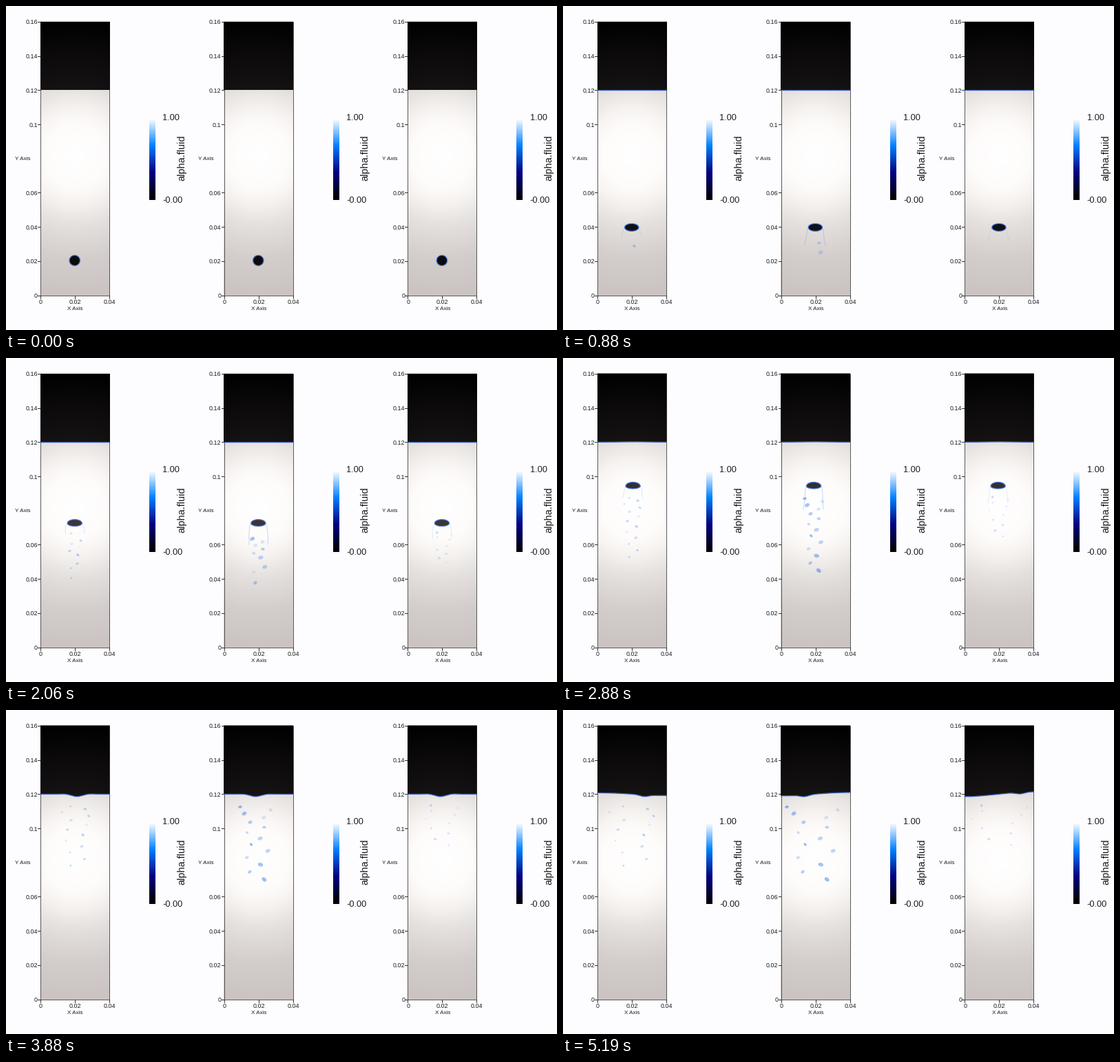
A matplotlib script for the animation above (5250 ms loop, 800 px wide and 471 px high).

```python
import numpy as np
import matplotlib.pyplot as plt
from matplotlib.animation import FuncAnimation
from matplotlib.collections import EllipseCollection
from matplotlib.patches import Polygon, Rectangle

W, H, DPI = 800, 471, 100
LOOP, STEP = 5250, 50
PX = 72 / DPI
TOP, BOTTOM, LEVEL = 23, 420.5, 122.3
MERGE = 3780
INK = "#1c1c1c"
XS = np.linspace(0, 100, 201)

fig = plt.figure(figsize=(W / DPI, H / DPI), dpi=DPI, facecolor="#fdfcfe")
ax = fig.add_axes([0, 0, 1, 1])
ax.axis("off")


def ramp(d, stops, colors):
    colors = np.array(colors) / 255
    return np.stack([np.interp(d, stops, colors[:, k]) for k in range(3)], -1)


def liquid(d):
    return ramp(d, [0, 45, 70, 100, 150, 200],
                [(255, 255, 255), (254, 252, 251), (246, 242, 240),
                 (229, 225, 223), (211, 205, 203), (203, 196, 194)])


def gas(d):
    return ramp(d, [20, 45, 100, 150, 200],
                [(62, 53, 55), (44, 39, 41), (20, 18, 18), (12, 10, 11), (0, 0, 0)])


def shade(func):
    y, x = np.mgrid[TOP:BOTTOM:398j, -50:50:101j]
    return func(np.hypot(x, y - 218))


def label(x, y, s, size, va="center_baseline", **kw):
    ax.text(x, y, s, fontsize=size * PX, family="Liberation Sans", color=INK, va=va, **kw)


def bell(center, width):
    return np.exp(-((XS - center) / width) ** 2)


def bubble_y(t):
    """Short start from rest, then a nearly steady rise to the surface."""
    speed, settle = 0.068, 332
    if t < settle:
        return 370 - speed * t * t / (2 * settle)
    return np.interp(t, [settle, 880, 2060, 2880, 3380, MERGE],
                     [358.7, 321.5, 241, 185.5, 148, LEVEL])


class Panel:
    def __init__(self, left, drift, lean, dip, tilt, notch, drops, tail, seed):
        self.left, self.drift, self.lean = left, drift, lean
        self.dip, self.tilt, self.notch = dip, tilt, notch
        self.tail_alpha, self.tail_len = tail
        self.static()
        ext = (left - 0.5, left + 100.5, BOTTOM + 0.5, TOP - 0.5)
        ax.imshow(shade(liquid), extent=ext, aspect="auto", zorder=1)
        self.make_drops(*drops, np.random.default_rng(seed))
        self.tails = [ax.plot([], [], color="#7fa8ea", lw=PX, zorder=2)[0] for _ in range(2)]
        self.bubble = Polygon(np.eye(3, 2), ec="#4a78e0", lw=1.2 * PX, zorder=3)
        self.air = Polygon(np.eye(3, 2), fc="none", ec="none")
        ax.add_patch(self.bubble)
        ax.add_patch(self.air)
        dark = ax.imshow(shade(gas), extent=ext, aspect="auto", zorder=4)
        dark.set_clip_path(self.air)
        self.line, = ax.plot([], [], color="#355fc0", lw=1.3 * PX, zorder=5)

    def static(self):
        x0 = self.left
        ax.add_patch(Rectangle((x0, TOP), 100, BOTTOM - TOP, fill=False,
                               ec="#4a4a4a", lw=0.9 * PX, zorder=2.5))
        for i in range(9):
            y = BOTTOM - i * (BOTTOM - TOP) / 8
            if i != 4:
                ax.plot([x0 - 4, x0], [y, y], color=INK, lw=0.9 * PX)
                label(x0 - 4, y, f"{i * 0.02:.2g}", 8.9, ha="right")
        label(x0 - 15, 221.5, "Y Axis", 8.1, ha="right")
        for i, s in enumerate(["0", "0.02", "0.04"]):
            x = x0 + 50 * i
            ax.plot([x, x], [BOTTOM, BOTTOM + 4], color=INK, lw=0.9 * PX)
            label(x + 0.5, 429.5, s, 8.9, ha="center")
        label(x0 + 50.5, 440, "X Axis", 8.2, ha="center")
        bar = ramp(np.linspace(1, 0, 64), [0, 1 / 3, 2 / 3, 1],
                   [(0, 0, 0), (0, 0, 128), (0, 128, 255), (255, 255, 255)])
        ax.imshow(bar[:, None], extent=(x0 + 158, x0 + 166.5, 282, 163), aspect="auto")
        label(x0 + 177.5, 161, "1.00", 12.8, ha="left")
        label(x0 + 177.5, 281, "-0.00", 12.8, ha="left")
        label(x0 + 205, 221, "alpha.fluid", 14.5, va="center", ha="center", rotation=90)

    def make_drops(self, n, size, strength, reach, rng):
        """Droplets shed by the bubble, each trailing it by its own gap."""
        self.gap = np.linspace(0.12, 1, n) ** 1.5 * reach + 8
        side = np.where(np.arange(n) % 2, 1, -1)
        self.spread = side * rng.uniform(0.3, 1, n) * (1 - self.gap / 220)
        self.birth = rng.uniform(500, 2600, n)
        self.alpha = strength * rng.uniform(0.5, 1.6, n)
        d = size * rng.uniform(0.8, 1.3, n)
        self.drops = EllipseCollection(
            d * 1.2, d * 0.85, rng.uniform(-60, 60, n), units="x",
            offsets=np.zeros((n, 2)), offset_transform=ax.transData, linewidths=0, zorder=2)
        ax.add_collection(self.drops)

    def center(self, t):
        return 49.7 + self.drift * np.interp(t, [2200, 3380], [0, 1])

    def draw_surface(self, t):
        # dome, crater, rebound, then troughs running out into a slow slosh
        keys = [2700, 3380, 3720, 3810, 4050, 4440, 5190]
        rise, width, dip, away = (np.interp(t, keys, v) for v in (
            [0, 2, 9, -7, 6, 2, 0], [28, 28, 12, 10, 13, 18, 20],
            [0, 0, 0, -0.3, 0.6, 1, 0], [18, 18, 18, 18, 20, 33, 40]))
        slosh = np.interp(t, [4440, 5190], [0, 1])
        c = self.center(t) - self.drift * slosh
        y = LEVEL - rise * bell(c, width)
        y += self.dip * dip * (bell(c - away, 8) + bell(c + away, 8))
        y += slosh * (self.tilt * np.cos(np.pi * XS / 100) + 2.5 * bell(self.notch, 9))

        x = self.left + XS
        edge = np.column_stack([x, y])
        edge[[0, -1], 0] += [-0.5, 0.5]
        self.air.set_xy(np.vstack([edge, [edge[-1, 0], TOP - 0.5], [edge[0, 0], TOP - 0.5]]))
        self.line.set_data(x, y)
        self.line.set_alpha(np.interp(t, [30, 250], [0, 1]))

    def draw_bubble(self, t):
        on = t < MERGE
        self.bubble.set_visible(on)
        for tail in self.tails:
            tail.set_visible(on and t > 250)
        if not on:
            return
        cx, cy = self.left + self.center(t), bubble_y(t)
        rx = np.interp(t, [0, 400, 880, 2060], [7.6, 9.2, 10.2, 10.6])
        ry = np.interp(t, [0, 400, 880, 2060], [7.6, 6.6, 5.5, 5.1])
        flat = np.interp(t, [1000, 2880], [0, 0.28])
        rot = np.radians(self.lean * np.interp(t, [2880, 3380], [0, 1]))
        a = np.linspace(0, 2 * np.pi, 48, endpoint=False)
        u, v = rx * np.cos(a), ry * np.sin(a)
        v = v * np.where(v > 0, 1 - flat, 1 + flat / 2) + ry * flat / 3
        self.bubble.set_xy(np.column_stack([cx + u * np.cos(rot) - v * np.sin(rot),
                                            cy + u * np.sin(rot) + v * np.cos(rot)]))
        self.bubble.set_facecolor(gas(abs(cy - 218)))

        s = np.linspace(0, 1, 14)
        size = self.tail_len * np.interp(t, [250, 880, 3380], [0.1, 1, 1.4])
        for side, tail in zip((-1, 1), self.tails):
            sway = np.sin(4 * s + t / 400 + side) * s
            tail.set_data(cx + side * (rx + 0.3 + 3.5 * np.sqrt(s)) + sway,
                          cy + side * rx * np.sin(rot) + 1 + size * s)
            tail.set_alpha(self.tail_alpha)

    def draw_drops(self, t):
        fan = np.interp(t, [880, 2880, 3380, 4440, 5190], [12, 16, 20, 36, 46])
        lag = np.interp(t, [250, 880, 2900], [0, 0.4, 1])
        x = self.left + self.center(t) + self.spread * fan
        y = bubble_y(t) + 6 + self.gap * lag
        self.drops.set_offsets(np.column_stack([x, y]))
        fade = np.clip((t - self.birth) / 350, 0, 1)
        self.drops.set_facecolor([(0.12, 0.43, 0.9, a) for a in self.alpha * fade])

    def draw(self, t):
        self.draw_surface(t)
        self.draw_bubble(t)
        self.draw_drops(t)


panels = [
    Panel(50, drift=3.3, lean=14, dip=7, tilt=-2, notch=68,
          drops=(13, 3.2, 0.2, 90), tail=(0.25, 12), seed=3),
    Panel(316.6, drift=-4, lean=-10, dip=3.8, tilt=2.5, notch=34,
          drops=(14, 5, 0.32, 110), tail=(0.45, 25), seed=5),
    Panel(583.2, drift=-2.2, lean=-3, dip=8, tilt=3.5, notch=80,
          drops=(10, 3.1, 0.17, 60), tail=(0.2, 18), seed=8),
]
ax.set_xlim(0, W)
ax.set_ylim(H, 0)


def update(i):
    for p in panels:
        p.draw((i + 0.5) * STEP)
    return []


anim = FuncAnimation(fig, update, frames=LOOP // STEP, interval=STEP,
                     repeat=True, repeat_delay=0, blit=False)
plt.show()
```
